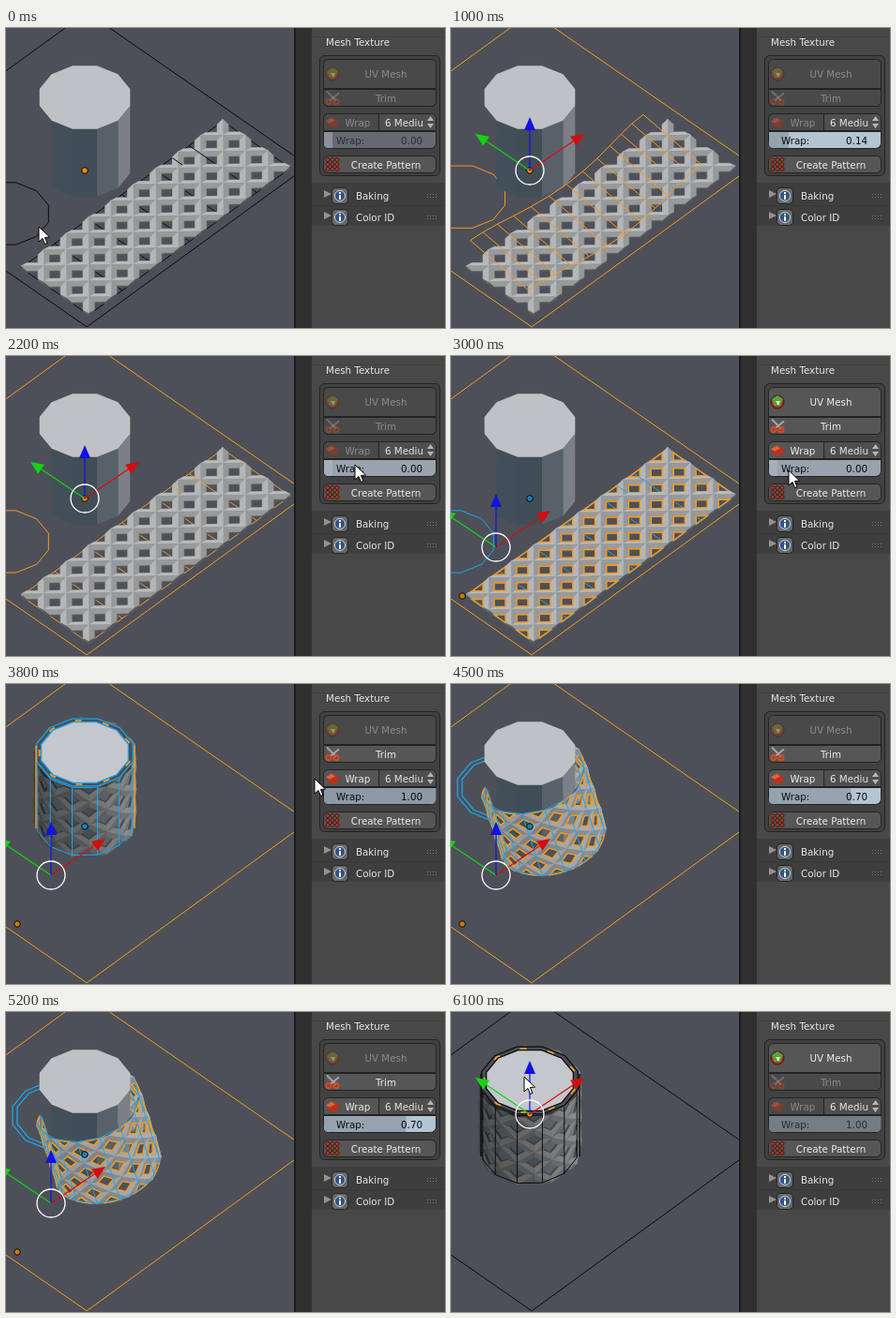
These frames come from a looping animation (468x320 px, 6.2 s). An HTML page with a canvas:

```html
<!DOCTYPE html>
<html>
<head>
<meta charset="utf-8">
<style>
html, body { margin: 0; width: 468px; height: 320px; overflow: hidden; background: #484848; }
canvas { display: block; }
</style>
</head>
<body>
<canvas id="stage" width="468" height="320"></canvas>
<script>
const c = document.getElementById('stage').getContext('2d');
const LOOP = 6200, TAU = Math.PI * 2;
const ORANGE = '#f79a1c', CYAN = '#1ba6ee', BLACK = '#0c0c0e';

// Keyframes: [time, ...values], linear in between
const wrapKeys = [[0, 0], [800, 0], [1600, .57], [1850, 1], [2100, 0], [3500, 0], [3800, 1],
  [4300, 1], [4800, .25], [4930, 0], [5200, .7], [5400, 1], [6200, 1]];
const mouseKeys = [[0, 35, 212], [200, 45, 201], [700, 372, 116], [2200, 372, 116], [2500, 190, 170],
  [2800, 380, 136], [3000, 360, 122], [3400, 360, 122], [3800, 329, 101], [4200, 360, 118],
  [5600, 360, 118], [6000, 78, 69], [6200, 78, 69]];
const drags = [[800, 2150], [3450, 3750], [4250, 5550]];

const mix = (a, b, k) => a + (b - a) * k;
function sample(keys, t) {
  const i = Math.max(1, keys.findIndex(k => k[0] > t));
  const a = keys[i - 1], b = keys[i], k = (t - a[0]) / (b[0] - a[0]);
  return a.slice(1).map((v, j) => mix(v, b[j + 1], k));
}

function path(points, closed) {
  c.beginPath();
  points.forEach(p => c.lineTo(p[0], p[1]));
  if (closed) c.closePath();
}
function line(points, color, width = 1, closed = false) {
  path(points, closed);
  c.strokeStyle = color;
  c.lineWidth = width;
  c.stroke();
}
function fill(points, color) {
  path(points, true);
  c.fillStyle = color;
  c.fill();
}
function disc(x, y, r, color, edge) {
  c.beginPath();
  c.arc(x, y, r, 0, TAU);
  c.lineWidth = 1;
  if (color) { c.fillStyle = color; c.fill(); }
  if (edge) { c.strokeStyle = edge; c.stroke(); }
}

const project = (x, y, z) => [84 + .707 * (x - y), 151 - .515 * x - .49 * y - .72 * z];

// Point of the strip: u along, v across (0..1), n above the surface, w = amount wrapped
function strip(u, v, n, w) {
  const flatX = (u - .5) * 304, a = (u - .5) * TAU, r = 51 + n;
  const x = mix(flatX, r * Math.sin(a), w);
  const y = mix(-158 + 102 * v, -r * Math.cos(a), w);
  const p = project(x, y, mix(n, 6 + 100 * v, w));
  p.depth = -(x + y);
  p.side = (x - y) / 72;
  return p;
}

const ring = (x, y, r) => Array.from({ length: 12 }, (_, i) => {
  const a = (i + .5) * TAU / 12;
  return [x + r * Math.cos(a), y + .7 * r * Math.sin(a)];
});

// Diagonal lattice on a grid of half cells; bars are roofs with a ridge and two slopes
const COLS = 18, ROWS = 6;
const clamp = (v, max) => Math.min(max, Math.max(0, v));
const node = (i, j, n, w) => strip(clamp(i, COLS) / COLS, clamp(j, ROWS) / ROWS, n, w);
const bars = [], holes = [];
for (let i = 0; i <= COLS; i++) for (let j = 0; j <= ROWS; j++) {
  const odd = (i + j) % 2;
  if (odd) holes.push([i, j]);
  if (i < COLS && j < ROWS) bars.push({ i, j: j + odd, s: odd ? -1 : 1 });
}

function drawBars(w, front) {
  const faces = bars.flatMap(({ i, j, s }) => {
    const slope = (p, q, tone) => {
      const ends = [node(i, j, 4, w), node(i + 1, j + s, 4, w)];
      return {
        tone, side: ends[0].side, depth: ends[0].depth + ends[1].depth,
        top: [ends[0], node(...p, 2.5, w), node(...q, 2.5, w), ends[1]],
        base: [node(i, j, 0, w), node(...p, 0, w), node(...q, 0, w), node(i + 1, j + s, 0, w)]
      };
    };
    return [
      slope([i + .5, j], [i + 1, j + s / 2], s > 0 ? 150 : 186),
      slope([i, j + s / 2], [i + .5, j + s], s > 0 ? 180 : 152)
    ];
  }).filter(f => (f.depth >= 0) === front).sort((a, b) => a.depth - b.depth);
  for (const [part, light] of [['base', .55], ['top', 1]]) for (const f of faces) {
    const g = Math.round(f.tone * light * mix(1, .6 + .17 * f.side, w ** 3));
    const color = `rgb(${g},${g + 2},${g + 4})`;
    fill(f[part], color);
    line(f[part], color, .6, true);
  }
}

function drawHoles(w, front) {
  for (const [i, j] of holes) {
    const quad = [[.5, 0], [0, .5], [-.5, 0], [0, -.5]].map(d => node(i + d[0], j + d[1], 2, w));
    if ((quad[0].depth + quad[2].depth >= 0) === front) line(quad, ORANGE, 1.4, true);
  }
}

function drawWire(w, front, color) {
  const piece = (a, b) => {
    if ((a.depth + b.depth >= 0) === front) line([a, b], color);
  };
  for (let i = 0; i <= 12; i++) {
    const low = strip(i / 12, 0, 1, w), high = strip(i / 12, 1, 1, w);
    piece(low, high);
    if (i < 12) {
      piece(low, strip((i + 1) / 12, 0, 1, w));
      piece(high, strip((i + 1) / 12, 1, 1, w));
    }
  }
}

function drawCylinder() {
  const top = ring(84, 74, 50);
  ['#8f9397', '#7b8086', '#58616a', '#414d57', '#434f58'].forEach((color, i) => {
    const a = top[(i + 11) % 12], b = top[i];
    fill([a, b, [b[0], b[1] + 72], [a[0], a[1] + 72]], color);
  });
  fill(top, '#bfc1c4');
}

function drawCap(w, sel, color) {
  const x = mix(-2, 84, w), y = mix(198, 73, w);
  if (w > .97) {
    line(ring(x, y, 51), '#4b4f55', 5, true);
    c.setLineDash([7, 23]);
    line(ring(x, y, 50), ORANGE, 2, true);
    c.setLineDash([]);
  }
  if (sel > 1 && w > .02) {
    line(ring(x, y, 48), color, 1.3, true);
    line(ring(x, y, 53), color, 1.3, true);
  } else line(ring(x, y, 49), color, 1, true);
}

function drawGizmo(x, y) {
  const arrow = (dx, dy, color) => {
    const k = Math.hypot(dx, dy), nx = -dy / k * 6, ny = dx / k * 6;
    const bx = x + dx * (1 - 14 / k), by = y + dy * (1 - 14 / k);
    line([[x, y], [bx, by]], color, 1.2);
    fill([[x + dx, y + dy], [bx + nx, by + ny], [bx - nx, by - ny]], color);
  };
  arrow(-58, -39, '#12d412');
  arrow(58, -39, '#d40d0d');
  arrow(0, -57, '#1212e0');
  c.lineWidth = 1.3;
  c.beginPath();
  c.arc(x, y, 15, 0, TAU);
  c.strokeStyle = '#fff';
  c.stroke();
}

function drawView(sel, w) {
  const barWrap = sel < 2 ? 0 : w;
  const frameColor = sel === 1 || sel === 2 ? ORANGE : BLACK;
  const wireColor = [BLACK, ORANGE, CYAN, BLACK][sel];
  const closed = w > .97;
  c.save();
  c.beginPath();
  c.rect(0, 0, 307, 320);
  c.clip();
  c.fillStyle = '#4d5059';
  c.fillRect(0, 0, 307, 320);
  const corners = [[-1, -1], [1, -1], [1, 1], [-1, 1]];
  line(corners.map(([x, y]) => project(x * 167 + 1.5, y * 167 - 1.5, 0)), frameColor, 1, true);
  if (!closed) drawCap(w, sel, wireColor);
  for (const front of [false, true]) {
    if (front) drawCylinder();
    if (w <= .02) drawWire(w, front, wireColor);
    drawBars(barWrap, front);
    if (sel === 2 && !closed) drawHoles(w, front);
    if (w > .02) drawWire(w, front, wireColor);
  }
  if (closed) {
    if (sel > 1) fill(ring(84, 73, 49), '#c4c7cd');
    drawCap(w, sel, wireColor);
    if (sel > 1) for (const x of [32, 137]) line([[x, 66], [x, 154]], sel === 2 ? ORANGE : BLACK, 1.5);
  }
  if (sel < 3) disc(84, 152, 3.3, sel === 2 ? '#1583b8' : '#f28a0c', BLACK);
  if (sel === 2) disc(12, 256, 3.3, '#c9730f', BLACK);
  if (sel === 3) disc(84, 109, 3.3, '#f28a0c', BLACK);
  if (sel) drawGizmo(...[[84, 152], [48, 204], [84, 109]][sel - 1]);
  c.restore();
}

function text(str, x, y, color = '#e6e6e6', align = 'left') {
  c.font = '10.3px "DejaVu Sans", sans-serif';
  c.textAlign = align;
  c.fillStyle = color;
  c.fillText(str, x, y);
}
function box(x, y, w, h, color, radii = 4) {
  c.beginPath();
  c.roundRect(x + .5, y + .5, w - 1, h - 1, radii);
  c.fillStyle = color;
  c.fill();
  c.lineWidth = 1;
  c.strokeStyle = '#232323';
  c.stroke();
}
function button(label, x, y, w, h, on, radii, textX, icon) {
  box(x, y, w, h, on ? '#565656' : '#494949', radii);
  text(label, textX, y + h / 2 + 4, on ? '#ececec' : '#8c8c8c', 'center');
  c.globalAlpha = on ? 1 : .4;
  icon(348, y + h / 2);
  c.globalAlpha = 1;
}

const icons = {
  mesh(x, y) {
    disc(x, y, 7, '#b32d1c', '#3a1a12');
    fill([[x - 6, y - 3], [x, y - 7], [x + 6, y - 3], [x + 3, y + 4], [x - 3, y + 4]], '#4fa83d');
    fill([[x - 2, y - 1], [x + 3, y - 1], [x + 1, y + 4]], '#e8d9c0');
  },
  scissors(x, y) {
    line([[x - 6, y - 7], [x + 4, y + 3]], '#a6a6a6', 2);
    line([[x + 7, y - 5], [x - 3, y + 3]], '#a6a6a6', 2);
    for (const dx of [-4, 4]) {
      c.beginPath();
      c.arc(x + dx, y + 4, 2.6, 0, TAU);
      c.strokeStyle = '#d9481e';
      c.lineWidth = 2;
      c.stroke();
    }
  },
  wrap(x, y) {
    fill([[x - 7, y - 1], [x - 1, y - 5], [x + 7, y - 1], [x + 5, y + 5], [x - 2, y + 6]], '#b8331a');
    fill([[x - 7, y - 1], [x - 1, y - 5], [x + 3, y - 2], [x - 3, y + 1]], '#e4633b');
  },
  pattern(x, y) {
    for (let i = 0; i < 9; i++) disc(x - 5 + i % 3 * 5, y - 5 + Math.floor(i / 3) * 5, 2, '#a83c2a', '#4a1a12');
  }
};

function drawSlider(w, on, dragging) {
  const [base, filled] = !on ? ['#666b72', '#747c85'] : dragging ? ['#b3c4d2', '#95a3b0'] : ['#98a3af', '#8c98a5'];
  box(338, 110, 121, 19, base, [0, 0, 6, 6]);
  c.save();
  c.clip();
  c.fillStyle = filled;
  c.fillRect(339, 111, w ? 4 + w * 119 : 0, 17);
  if (!w && !dragging) {
    c.fillStyle = on ? '#a4afba' : '#8a9199';
    c.fillRect(339, 111, 9, 17);
  }
  c.restore();
  const color = on ? '#0a0a0a' : '#2b2d30';
  text('Wrap:', 352, 123.5, color);
  text(w.toFixed(2), 444, 123.5, color, 'right');
}

function drawHeader(label, y) {
  fill([[339, y - 6], [347, y - 2], [339, y + 2]], '#929292');
  box(347, y - 9, 18, 18, '#686868');
  disc(356, y, 5.6, '#33527d', '#c4d2e2');
  c.fillStyle = '#fff';
  c.fillRect(355, y - 4, 2, 2);
  c.fillRect(355, y - 1, 2, 5);
  text(label, 373, y + 4);
  for (let i = 0; i < 8; i++) {
    c.fillStyle = '#777';
    c.fillRect(449 + i % 4 * 3, y - 2 + (i > 3 ? 3 : 0), 1, 1);
  }
}

function drawPanel(t, sel, w, dragging) {
  const rect = (x, y, rw, h, color) => { c.fillStyle = color; c.fillRect(x, y, rw, h); };
  rect(307, 0, 2, 320, '#1c1c1c');
  rect(309, 0, 17, 320, '#303030');
  rect(326, 0, 142, 320, '#484848');
  rect(326, 9, 142, 1, '#424242');
  rect(326, 165, 142, 46, '#3e3e3e');
  rect(326, 189, 142, 1, '#383838');
  text('Mesh Texture', 341, 19);
  box(334, 29, 129, 129, '#414141', 5);
  const both = sel === 2;
  button('UV Mesh', 338, 33, 121, 32, sel === 3 || both && t < 3600, [5, 5, 0, 0], 405, icons.mesh);
  button('Trim', 338, 65, 121, 19, both, [0, 0, 5, 5], 405, icons.scissors);
  button('Wrap', 338, 91, 60, 19, both, [5, 0, 0, 0], 375, icons.wrap);
  box(397, 91, 62, 19, '#4f4f4f', [0, 5, 0, 0]);
  text('6 Mediu', 404, 104.5);
  fill([[449, 99], [452.5, 94], [456, 99]], '#b5b5b5');
  fill([[449, 102], [452.5, 107], [456, 102]], '#b5b5b5');
  drawSlider(w, sel === 1 || both, dragging);
  button('Create Pattern', 338, 136, 121, 19, true, 5, 405, icons.pattern);
  drawHeader('Baking', 179);
  drawHeader('Color ID', 202);
}

function drawCursor(x, y) {
  const shape = [[0, 0], [0, 16], [4, 12.5], [6.5, 18.5], [9, 17.5], [6.5, 11.5], [11.5, 11]].map(p => [x + p[0], y + p[1]]);
  fill(shape, '#fff');
  line(shape, '#000', 1, true);
}

function render(t) {
  const [w] = sample(wrapKeys, t);
  const sel = t < 300 ? 0 : t < 2500 ? 1 : t < 5900 ? 2 : 3;
  const dragging = drags.some(([a, b]) => t >= a && t < b);
  drawView(sel, w);
  drawPanel(t, sel, w, dragging);
  if (!dragging) drawCursor(...sample(mouseKeys, t));
}

function tick() {
  render(Math.floor(performance.now() % LOOP / 100) * 100);
  requestAnimationFrame(tick);
}
tick();
</script>
</body>
</html>
```
